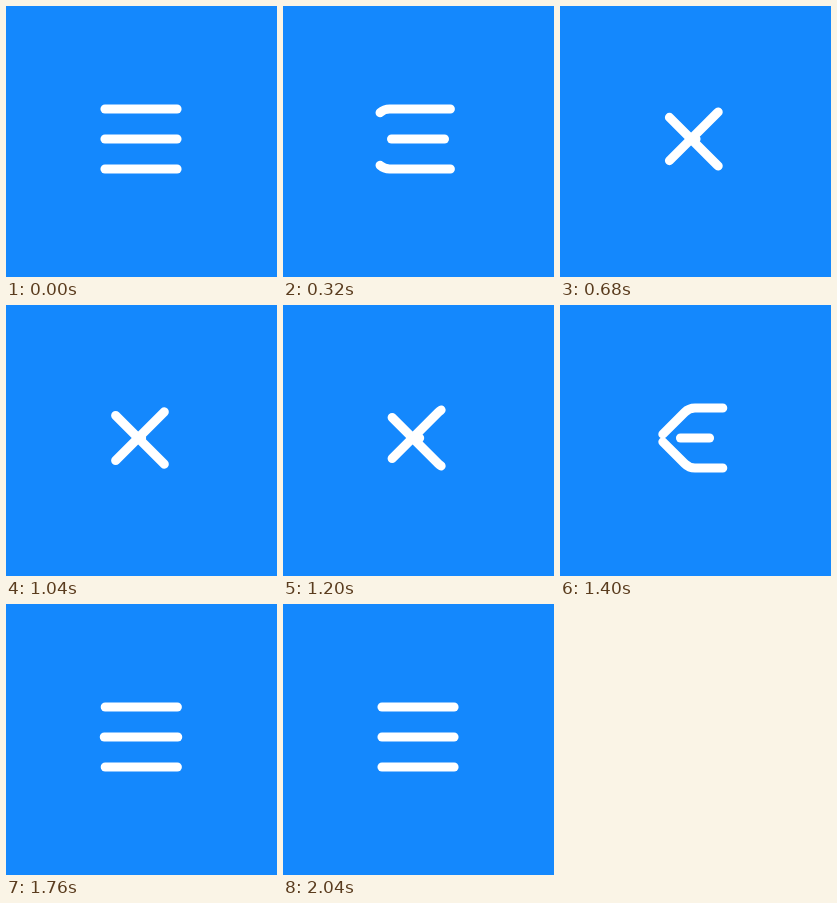
Recreate the animation shown at these times as an HTML page. Size 271 by 271 pixels, loop 2800 ms.

```html
<!DOCTYPE html>
<html lang="en">
<head>
<meta charset="utf-8">
<title>Menu to close icon</title>
<style>
  html, body { margin: 0; height: 100%; overflow: hidden; background: #1488fd; }
  svg { display: block; width: 100%; height: 100%; }
  path { fill: none; stroke: #fff; stroke-width: 9.1; stroke-linecap: round; }
</style>
</head>
<body>
<svg viewBox="0 0 271 271">
  <g id="arms">
    <path d="M120-30H6Q0-30-4.2-25.8L-80 50"/>
    <path d="M120 30H6Q0 30-4.2 25.8L-80-50"/>
  </g>
  <path id="middle"/>
</svg>
<script>
const LOOP = 2800, STEP = 40, MORPH = 700, CORNER = 120;
const arms = document.getElementById('arms');
const middle = document.getElementById('middle');

const ramp = (t, start, span) => Math.min(1, Math.max(0, (t - start) / span));
const bump = (t, start, span) => Math.sin(Math.PI * ramp(t, start, span)) ** 2;

function morph(t, start) {
  const u = ramp(t, start, MORPH);
  return u ** 3 * (10 - 15 * u + 6 * u * u);
}

function draw(now) {
  const t = Math.floor(now % LOOP / STEP) * STEP;
  const open = morph(t, 60) - morph(t, 1090);
  const swing = bump(t, 0, 300) + bump(t, 1640, 400);

  // How far the tips have slid past the bend, which itself moves right
  const slide = -21 + 94.5 * open - 3 * swing;
  const length = 71.3 - 0.035 * slide;
  const half = Math.max(0.5, 36 - 0.375 * (slide + 21));

  arms.setAttribute('transform', `translate(${96.7 + 0.89 * slide} 133)`);
  arms.setAttribute('stroke-dasharray', `${length} 400`);
  arms.setAttribute('stroke-dashoffset', length - slide - CORNER);
  middle.setAttribute('d', `M${135 - half} 133h${2 * half}`);
  requestAnimationFrame(draw);
}
draw(0);
</script>
</body>
</html>
```
